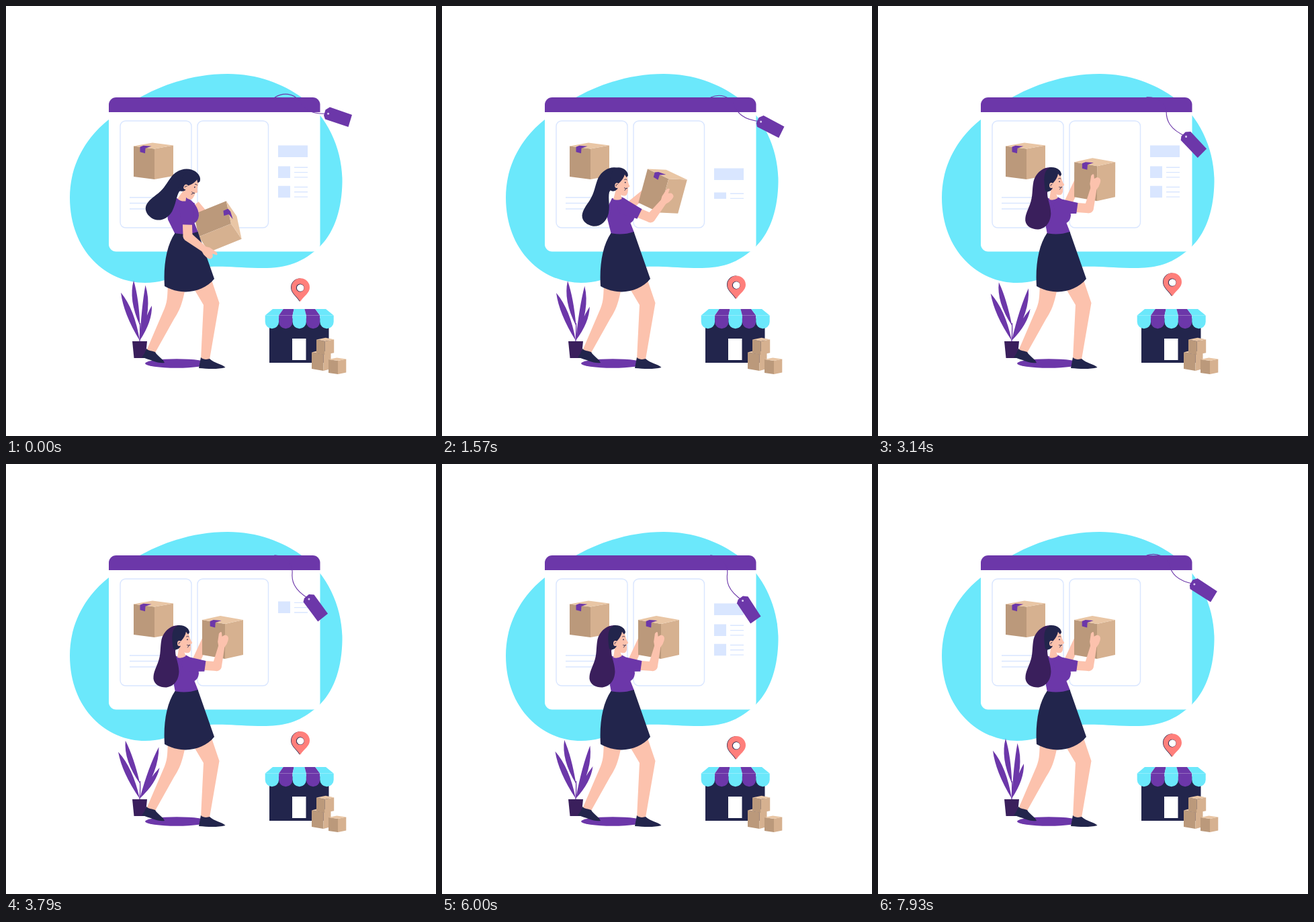
An HTML page that plays this animation: 640x640 px, repeating every 8000 ms.

```html
<!DOCTYPE html>
<html lang="en">
<head>
<meta charset="utf-8">
<title>Online shop</title>
<style>
html, body { margin: 0; width: 100%; height: 100%; overflow: hidden; background: #fff; }
svg { display: block; width: 100%; height: 100%; }
.purple { fill: #6c37a9 } .navy { fill: #22254c } .plum { fill: #3a1f5c }
.cyan { fill: #6be8fb } .skin { fill: #fcc2ad } .pale { fill: #d9e6ff }
.rule { fill: none; stroke: #d9e6ff; stroke-width: 1.4 }
.ink { fill: none; stroke: #22254c; stroke-width: .8; stroke-linecap: round }
</style>
</head>
<body>
<svg viewBox="0 0 640 640">
  <clipPath id="panel"><path d="M400 204h55v83h-55z"/></clipPath>

  <path class="cyan" d="M330 101C375 101 412 116 440 136C480 165 501 215 500.5 262C500 300 490 335 468 357C440 384 415 391 375 390C340 389 318 386 290 389C260 394 245 412 207 412C150 412 95 365 95 285C95 235 120 195 153 169C185 140 250 101 330 101Z"/>

  <!-- browser window -->
  <rect x="153" y="136" width="314.5" height="229.5" rx="11" fill="#fff"/>
  <path class="purple" d="M153 158V147a11 11 0 0 1 11-11H456.500a11 11 0 0 1 11 11V158Z"/>
  <g class="rule">
    <rect x="170" y="171" width="106" height="159" rx="8"/>
    <rect x="285" y="171" width="105.500" height="159" rx="8"/>
    <path d="M184 285h48M184 293.500h48M184 302h48"/>
  </g>
  <g id="cardBox"></g>
  <g clip-path="url(#panel)">
    <rect id="banner" class="pale" x="405" y="207.500" width="44" height="17.500"/>
    <g id="rows">
      <path class="pale" d="M405 238.500h18v17.500h-18zM405 267.700h18v17.500h-18z"/>
      <path class="rule" d="M429 240.300h20m-20 7.300h20m-20 7.300h20M429 269.500h20m-20 7.300h20m-20 7.300h20"/>
    </g>
  </g>

  <g id="tag">
    <path d="M400 136C413 128 428 130 436 141C442 152 452 162 479.500 160" fill="none" stroke="#6c37a9" stroke-width="1.1"/>
    <path class="purple" d="M473 163L475.500 154.500L482 150.500L515 162L509.500 180L475 168.500Z"/>
    <circle cx="479.500" cy="160.200" r="1.500" fill="#d9c9f0"/>
  </g>

  <!-- shop -->
  <path class="navy" d="M392 465H480.500V531H392Z"/>
  <path fill="#fff" d="M426 495h20.500v32h-20.500z"/>
  <g id="awning"></g>
  <path d="M386 460.500H488" stroke="#fff" stroke-opacity=".45" stroke-width=".6"/>
  <g id="stack"></g>
  <g id="pin">
    <path class="navy" d="M437 440C431 431 424 427 424 419A13.300 13.300 0 0 1 438 405.500L444 410Z"/>
    <path fill="#ff7f7b" d="M438 440C432 431 424.700 427 424.700 419A13.600 13.600 0 0 1 452 419C452 427 444 431 438 440Z"/>
    <circle class="navy" cx="437.800" cy="419.500" r="5.900"/>
    <circle cx="438.200" cy="419.500" r="5.300" fill="#fff"/>
  </g>

  <!-- plant -->
  <path id="leaves" class="purple"/>
  <path d="M199.500 472Q200 486 199 499" fill="none" stroke="#6c37a9" stroke-width="1.300"/>
  <path class="plum" d="M188 499H210L207.500 524H190.500Z"/>

  <!-- woman -->
  <ellipse class="purple" cx="254" cy="532" rx="47" ry="6.700"/>
  <path id="farArm" stroke="#fcc2ad" stroke-width="12"/>
  <g id="heldBox"></g>
  <path class="skin" d="M241 415L267 420C262 444 259 452 250 466L222 516L209 513L236 450C241 437 240 428 241 415ZM278 418L306 408L317.500 442L303 526L290 526L294 445Z"/>
  <path class="navy" d="M209 510C213 514 218 513 222 515C226 522 234 525 236 531C227 533 215 526 202 523Q207 517 209 510ZM290 523C294 527 300 526 303 525C310 532 322 533 326.500 538C315 541 300 540 287 539Z"/>
  <path id="torso" class="purple"/>
  <path class="navy" d="M251.500 338Q268 342 285.500 336L310 406C294 426 262 432 236 417C234 386 239 356 251.500 338Z"/>
  <g id="arm">
    <path class="skin" d="M20-7H45V7H20Z"/>
    <g id="forearm">
      <path class="skin" d="M0-7A7 7 0 0 0 0 7L33 4.500V-4.500Z"/>
      <path class="skin" d="M30-4.500L36-7L48-8Q52-7 51-4.500L45-2.500L48 1Q49 8 41 7.500Q35 7.500 30 4.500Z"/>
    </g>
    <path class="purple" d="M-4-12L28-7L27 9L0 11Q-12 4-4-12Z"/>
  </g>
  <g id="face">
    <path class="skin" d="M254 255L271 249C273 255 273 260 277.300 266Q276.500 268 274.700 268.200C275.500 273 276 279 272 281Q267 282 265.500 280L267.500 286Q261 290 255 288L257 275Z"/>
    <path class="ink" d="M268.500 257Q270.500 255.500 272 257M270.500 273.000L272.500 269.500M269.500 269.500Q272 271 274 269.500"/>
    <circle class="navy" cx="270" cy="261.300" r=".9"/>
  </g>
  <path id="hair" d="M259 240C246 239 235 248 231.500 261C229 274 231 283 226 296C222 306 219 312 219.500 320C221 329 230 333 239 332.500C250 331 257 322 257.500 309C257 296 252 288 252 278L258 262Z"/>
  <g id="cap">
    <path class="navy" d="M249 275C246 258 246 242 258 240C268 240 273 246 273 251L271 253.500Q268 250 268 249.500C267 256 263 261 260 264L259.500 272Q256 277 251 276Z"/>
    <ellipse class="skin" cx="258" cy="267" rx="3" ry="3.900"/>
    <path class="ink" d="M257 268Q256.500 265 259 265.300"/>
  </g>
</svg>
<script>
const LOOP = 8000;
const $ = id => document.getElementById(id);
const clamp = x => Math.min(1, Math.max(0, x));
const mix = (a, b, k) => a + (b - a) * k;
const sine = x => (1 - Math.cos(Math.PI * clamp(x))) / 2;
const span = (t, from, to) => sine((t - from) / (to - from));
const swing = (t, start, peak, end) => t < peak ? span(t, start, peak) : 1 - span(t, peak, end);
const move = (id, value) => $(id).setAttribute('transform', value);

// cubic-bezier(.2, 0, .2, 1), solved by bisection
function settle(x) {
  let lo = 0, hi = 1;
  for (let i = 0; i < 24; i++) {
    const s = (lo + hi) / 2;
    if (.6 * s * (1 - s) + s ** 3 < x) lo = s; else hi = s;
  }
  return lo * lo * (3 - 2 * lo);
}

// a carton around its upper front corner: left width and rise, right width and rise, height
function carton(x, y, lw, lr, rw, rr, h) {
  return `<g transform="translate(${x} ${y})">
    <path fill="#bb997b" d="M0 0L${-lw} ${-lr}v${h}L0 ${h}Z"/>
    <path fill="#d6b190" d="M0 0L${rw} ${-rr}v${h}L0 ${h}Z"/>
    <path fill="#e9c6a5" d="M0 0L${-lw} ${-lr}L${rw - lw} ${-lr - rr}L${rw} ${-rr}Z"/></g>`;
}
const tape = (x, y) =>
  `<path class="purple" transform="translate(${x} ${y})" d="M0 0L5-2L17-1L8 2L7.500 9.500L0 7.500Z"/>`;

$('cardBox').innerHTML = carton(221, 212.5, 31, 4, 28, 5, 45.5) + tape(199.5, 209.8);
$('heldBox').innerHTML = carton(0, 0, 34, 6, 27, 6, 52) + tape(-22.3, -4);
$('stack').innerHTML = carton(472.5, 518.5, 17.5, 3, 11, 3, 24.5) +
  carton(474.5, 499, 12.5, 2.5, 13.7, 2.8, 20) + carton(494, 528, 14, 2, 12.3, 2.5, 20);

$('awning').innerHTML = [0, 1, 2, 3, 4].map(i => {
  const w = 20.4, x = 385.7 + i * w, top = 397 + i * 15.8;
  return `<path class="${i % 2 ? 'purple' : 'cyan'}" d="M${top} 451h15.800L${x + w} 460.500v9.500a10.200 10.200 0 0 1 -20.400 0v-9.500Z"/>`;
}).join('');

// a leaf from its base to its tip; bow bends it sideways
function leaf(bx, by, tx, ty, width, bow) {
  const dx = tx - bx, dy = ty - by, len = Math.hypot(dx, dy);
  const side = d => `${bx + dx * .6 - dy / len * d} ${by + dy * .6 + dx / len * d}`;
  return `M${bx} ${by}Q${side(bow + width)} ${tx} ${ty}Q${side(bow - width)} ${bx} ${by}Z`;
}

function drawPlant(t) {
  const p = swing(t, 250, 4450, 8050);
  $('leaves').setAttribute('d',
    leaf(199, 498, mix(171, 166.8, p), mix(426.5, 428.5, p), 9, 1) +
    leaf(199.5, 476, mix(190, 177, p), mix(408.5, 412, p), 8, -4) +
    leaf(199, 498, mix(207.5, 228.7, p), mix(415.5, 421.5, p), 8.5, mix(6, 4, p)) +
    leaf(199, 498, mix(217, 229.3, p), mix(446, 452.5, p), 6.5, 2));
}

function drawPanel(t) {
  const c = t % 3300;
  const leaving = c < 1000;
  const exit = -85 * span(c, 200, 640);
  move('banner', `translate(0 ${leaving ? exit : 80 * (1 - span(c, 1330, 1770))})`);
  move('rows', `translate(0 ${leaving ? exit : 57 * (1 - span(c, 1350, 1930))})`);
}

function drawWoman(t) {
  const u = settle(clamp(t / 3400)), rest = 1 - u, bump = u * rest;
  move('heldBox', `translate(${335 - 9 * u + 53 * bump} ${324 - 86 * u}) rotate(${68 * rest})`);

  const upper = 4 + 84 * rest, lower = -77 + 115 * rest;
  move('arm', `translate(269 298) rotate(${upper})`);
  move('forearm', `translate(45 0) rotate(${lower - upper})`);
  const far = (-65 + 115 * rest) * Math.PI / 180;
  $('farArm').setAttribute('d', `M282 295L${282 + 37 * Math.cos(far)} ${295 + 37 * Math.sin(far)}`);

  const back = mix(239, 246, u);
  $('torso').setAttribute('d', `M253 286Q261 288 268 284.500C278 289 287 300 287 312Q286 320 280.500 323L286 337Q268 342 252 340L${back + 2} 318L${back} 304Z`);

  const head = `rotate(${27 * rest} 258 288)`;
  move('face', head);
  move('cap', head);
  move('hair', `translate(${-30 * bump} 0) rotate(${30 * rest + 30 * bump} 258 288)`);
  $('hair').setAttribute('class', t < 3100 ? 'navy' : 'plum');
}

function draw() {
  const t = performance.now() % LOOP;
  move('tag', `rotate(${41.2 * swing(t, 0, 5110, 9810)} 400 135)`);
  move('pin', `translate(0 ${4 * (Math.cos(2 * Math.PI * t / 6360) - 1)})`);
  drawPlant(t);
  drawPanel(t);
  drawWoman(t);
  requestAnimationFrame(draw);
}
draw();
</script>
</body>
</html>
```
